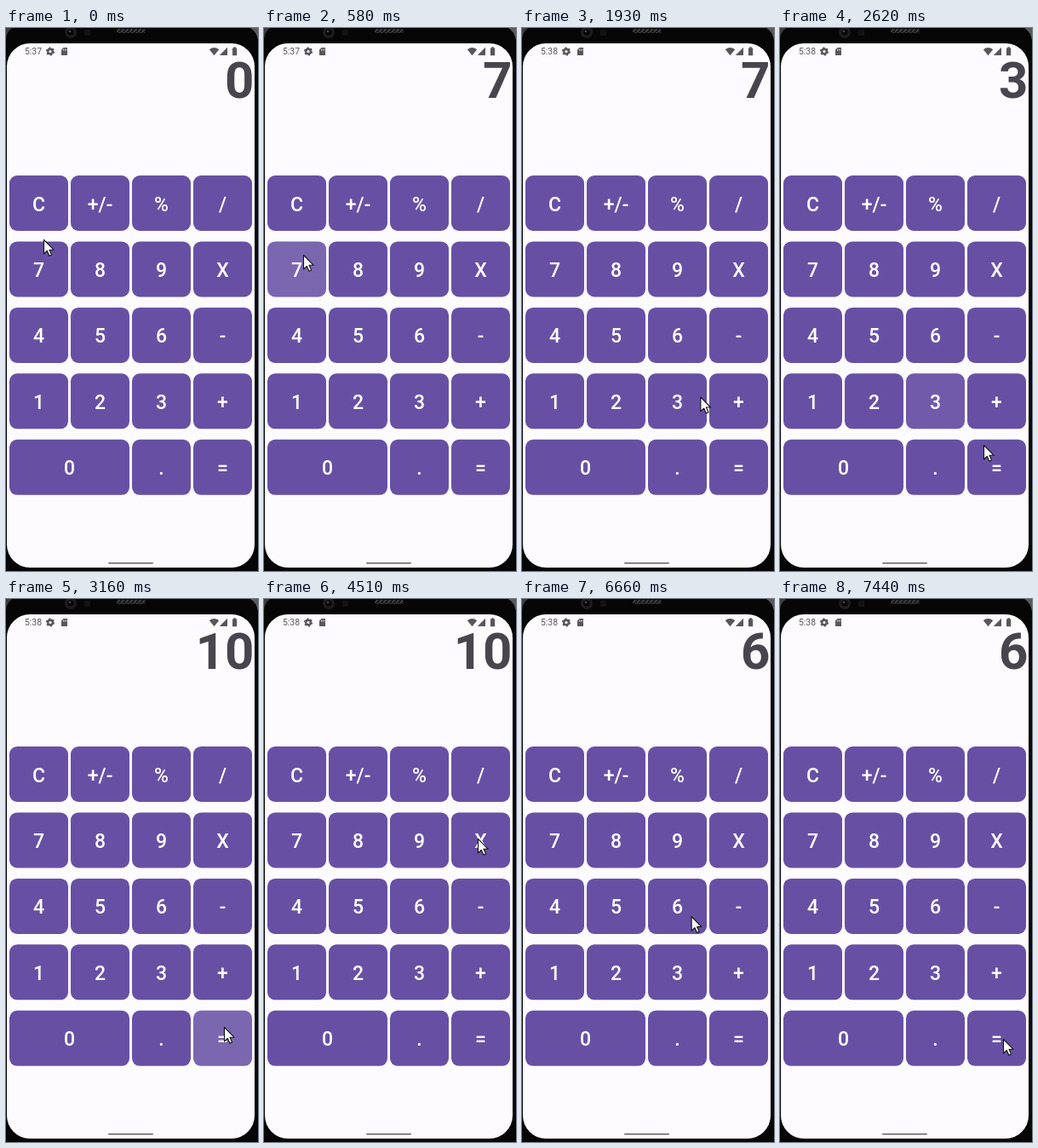
These frames come from a looping animation (296x637 px, 8000 ms). An HTML page:

```html
<!DOCTYPE html>
<html lang="en">
<head>
<meta charset="utf-8">
<title>Calculator</title>
<style>
  html, body { margin: 0; width: 100%; height: 100%; overflow: hidden; background: #060607; }
  svg { display: block; width: 296px; height: 637px; font-family: Roboto, sans-serif; }
  .key { fill: #6750a4; }
  .label { fill: #fff; font-size: 23px; font-weight: 500; text-anchor: middle; }
  .status { fill: #58565c; }
  #display { fill: #49454f; font-size: 60px; font-weight: 700; text-anchor: end; }
  #clock { font-size: 10.4px; }
</style>
</head>
<body>
<svg viewBox="0 0 296 637">
  <defs>
    <radialGradient id="glow">
      <stop offset=".75" stop-color="#fff"/>
      <stop offset="1" stop-color="#fff" stop-opacity="0"/>
    </radialGradient>
    <pattern id="mesh" width="5" height="5" patternUnits="userSpaceOnUse">
      <path d="M0 5L4 0" stroke="#4a4a4c" stroke-width="1.4"/>
    </pattern>
  </defs>

  <rect width="296" height="637" fill="#060607"/>
  <path d="M0 12Q1 5 7 0H0Z" fill="#3c3c3e"/>
  <path d="M287 0Q294 4 296 14V0Z" fill="#5a5a5c"/>
  <circle cx="76" cy="5" r="7" fill="#1d1d1f"/>
  <circle cx="76" cy="5" r="3.6" fill="#060607"/>
  <circle cx="75" cy="4" r="1.3" fill="#4a4a50"/>
  <rect x="92" y="2" width="7" height="7" rx="1" fill="#131315"/>
  <rect x="130" y="1" width="34" height="5" rx="2.5" fill="#19191b"/>
  <rect x="130" y="1" width="34" height="5" rx="2.5" fill="url(#mesh)"/>
  <rect x="1" y="18" width="291" height="615" rx="27" fill="#fefbff"/>

  <g class="status">
    <text id="clock" x="22" y="31.3">5:37</text>
    <circle cx="52" cy="27.5" r="2.8" fill="none" stroke="#58565c" stroke-width="2.4"/>
    <circle cx="52" cy="27.5" r="4.3" fill="none" stroke="#58565c" stroke-width="1.6" stroke-dasharray="2.25"/>
    <path d="M67.5 23H72V32H65V25.5Z"/>
    <path d="M67.5 24.6v2M69.1 24.6v2M70.7 24.6v2" stroke="#fefbff" stroke-width=".7"/>
    <path d="M238.8 25.2Q244.5 20.8 250.2 25.2L244.5 32.3Z"/>
    <path d="M260 22.8V32H250.8Z"/>
    <path d="M266 23.5h1.4v-1.2h2.4v1.2h1.4V32.3H266Z"/>
  </g>

  <text id="display" x="291.5" y="81.8">0</text>
  <g id="keys"></g>
  <rect x="120" y="627" width="53" height="1.6" rx=".8" fill="#625f66"/>
  <path id="cursor" d="M.5 .5V17L4.3 13.4L6.9 19.3L9.6 18.1L7 12.3H12.2Z"
        fill="#fff" stroke="#111" stroke-width="1.1" stroke-linejoin="round"/>
</svg>
<script>
const LOOP = 8000;
const byId = id => document.getElementById(id);
const make = (tag, attrs, parent) => {
  const el = document.createElementNS('http://www.w3.org/2000/svg', tag);
  for (const name in attrs) el.setAttribute(name, attrs[name]);
  return parent.appendChild(el);
};

// Keypad
const ripples = {};
const addKey = (text, col, row, span = 1) => {
  const x = 4 + 72 * col, y = 173 + 77.45 * row;
  const width = 72 * span - 3, height = 65;
  const g = byId('keys');
  const box = { x, y, width, height, rx: 9 };
  make('rect', { ...box, class: 'key' }, g);
  const clip = make('clipPath', { id: `clip${row}${col}` }, g);
  make('rect', box, clip);
  make('text', { x: x + width / 2, y: y + 41.5, class: 'label' }, g).textContent = text;
  const holder = make('g', { 'clip-path': `url(#clip${row}${col})` }, g);
  ripples[text] = make('circle', { cx: x + width / 2, cy: y + 30, r: 0, fill: 'url(#glow)' }, holder);
};
[['C', '+/-', '%', '/'], ['7', '8', '9', 'X'], ['4', '5', '6', '-'], ['1', '2', '3', '+']]
  .forEach((row, r) => row.forEach((text, c) => addKey(text, c, r)));
addKey('0', 0, 4, 2);
addKey('.', 2, 4);
addKey('=', 3, 4);

// Pointer moves: first step, last step, step count, bend point, end point
const start = [44, 248];
const moves = [
  [150, 150, 1, 45, 257, 46, 266],
  [694, 1090, 4, 150, 350, 262, 417],
  [1680, 2000, 3, 225, 425, 192, 440],
  [2470, 2620, 2, 215, 465, 239, 489],
  [2740, 3020, 3, 250, 497, 256, 502],
  [3400, 3400, 1, 253, 501, 251, 501],
  [3550, 4510, 8, 223, 390, 251, 281],
  [5450, 5870, 4, 215, 318, 183, 362],
  [6660, 7440, 7, 330, 455, 262, 516]
];

// Ripple states: time, key, radius, strength
const glows = [
  [430, '7', 36, .1], [562, '7', 90, .13], [694, '7', 90, .06], [826, '7', 0, 0],
  [1390, '+', 36, .09], [1510, '+', 90, .13], [1680, '+', 90, .06], [1840, '+', 0, 0],
  [2170, '3', 90, .13], [2470, '3', 90, .09], [2620, '3', 90, .06], [2740, '3', 90, .03], [2880, '3', 0, 0],
  [3020, '=', 36, .08], [3160, '=', 90, .13], [3400, '=', 90, .02], [3550, '=', 0, 0],
  [5060, 'X', 90, .08], [5450, 'X', 90, .04], [5590, 'X', 0, 0],
  [6150, '6', 90, .12], [6390, '6', 0, 0]
];
const readout = [[0, '0'], [562, '7'], [2170, '3'], [3160, '10'], [6150, '6']];
const clock = [[0, '5:37'], [1840, '5:38']];

const latest = (list, t) => list.filter(e => e[0] <= t).pop();

function pointerAt(t) {
  let [x, y] = start;
  for (const [t0, t1, n, bx, by, ex, ey] of moves) {
    if (t < t0) break;
    const k = t >= t1 ? n : Math.floor((t - t0) / (t1 - t0) * (n - 1) + 1e-6) + 1;
    const p = k / n, u = p * p * (3 - 2 * p), v = 1 - u;
    const bend = (a, b, c) => v * v * a + 2 * u * v * b + u * u * c;
    x = bend(x, bx, ex);
    y = bend(y, by, ey);
  }
  return [x, y];
}

function draw(t) {
  byId('display').textContent = latest(readout, t)[1];
  byId('clock').textContent = latest(clock, t)[1];
  for (const key in ripples) {
    const [, , r, strength] = latest(glows.filter(g => g[1] === key), t) || [0, key, 0, 0];
    ripples[key].setAttribute('r', r);
    ripples[key].setAttribute('opacity', strength);
  }
  byId('cursor').setAttribute('transform', `translate(${pointerAt(t)})`);
}

const origin = performance.now();
function tick() {
  draw((performance.now() - origin) % LOOP);
  requestAnimationFrame(tick);
}
tick();
</script>
</body>
</html>
```
